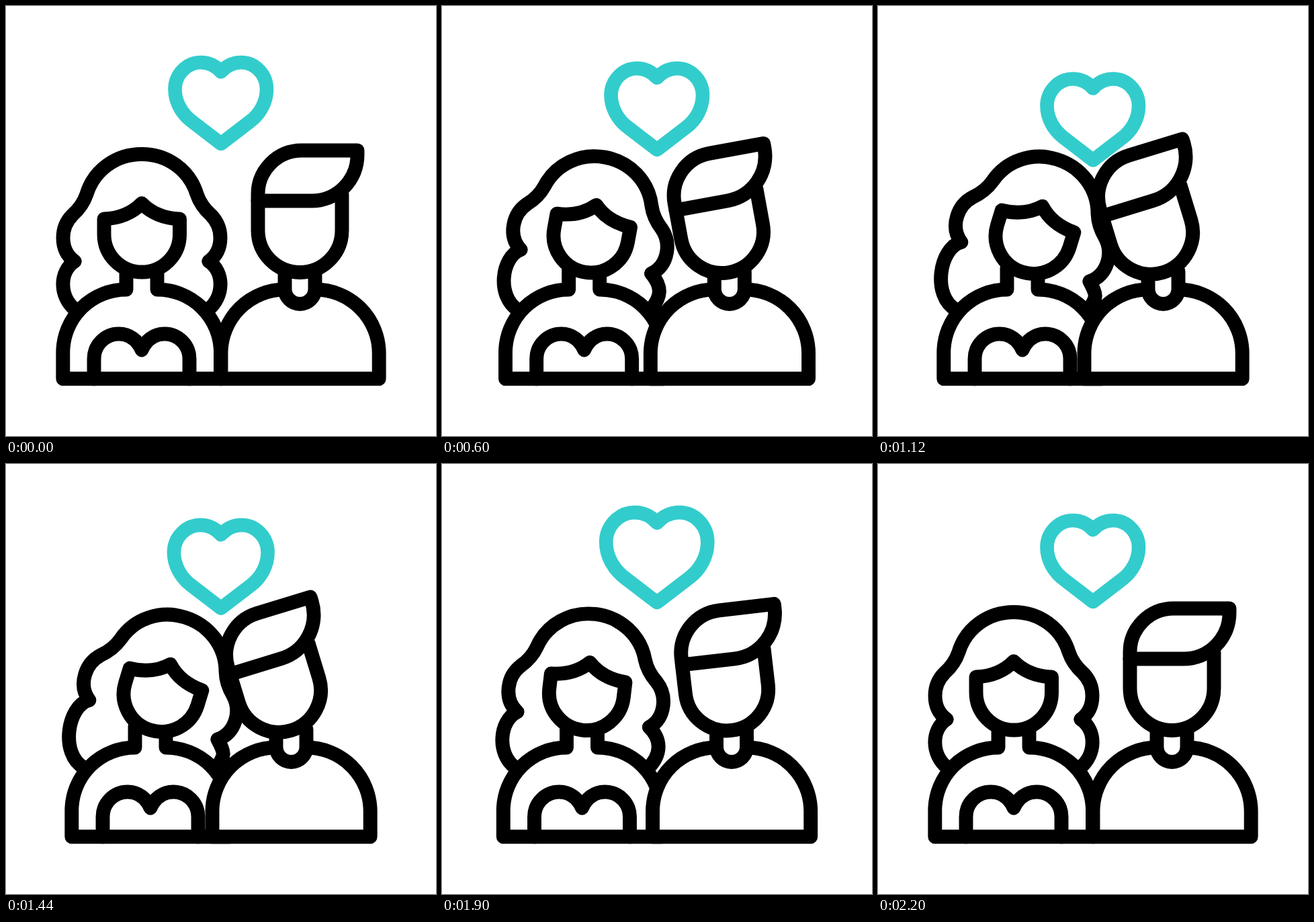
These frames come from a looping animation (640x640 px, 2.4 s). An HTML page:

```html
<!DOCTYPE html>
<html lang="en">
<head>
<meta charset="utf-8">
<title>Couple with beating heart</title>
<style>
  html, body { margin: 0; width: 100%; height: 100%; overflow: hidden; background: #fff; }
  svg { display: block; width: 100%; height: 100%; }
  path {
    fill: #fff; stroke: #000; stroke-width: 20.9;
    stroke-linecap: round; stroke-linejoin: round; vector-effect: non-scaling-stroke;
  }
  .line { fill: none; }
  #heart { fill: none; stroke: #33cccc; stroke-width: 20.6; }
</style>
</head>
<body>
<svg viewBox="0 0 640 640">
  <path id="heart" d="M320 98 C312 89 301 84 290 84 C269 84 251.5 102 251.5 124 C251.5 143 262 161 277 172 L320 205 L363 172 C378 161 388 143 388 124 C388 102 371 84 350 84 C339 84 328 89 320 98 Z"/>

  <g id="woman">
    <path class="line her-head" d="M102 380 C91 372 85 360 85 345 C85 332 90 320 99 311 C109 302 116 292 120 280 C131 244 164 220.5 202 220.5 C240 220.5 273 244 284 280 C288 292 295 302 305 311 C314 320 319 332 319 345 C319 360 313 372 302 380"/>
    <path class="line" id="locks"/>
    <path d="M179 390 V422 A94 94 0 0 0 84.8 515 V554.8 H319.5 V515 A94 94 0 0 0 225 422 V390"/>
    <path class="line" d="M131 554.8 V525 A37 37 0 0 1 168 488 C184 488 196 498 202 512 C208 498 220 488 236 488 A37 37 0 0 1 273 525 V554.8"/>
    <path class="her-head" d="M146 317 C168 316 187 309 202 293.7 C217 309 236 316 258.5 317 V340 A56.2 56 0 0 1 146 340 Z"/>
  </g>

  <g id="man">
    <path d="M415 422 A95 95 0 0 0 320 517 V554.8 H555.2 V517 A95 95 0 0 0 460 422"/>
    <path d="M415 395 V421 A22.5 22.5 0 0 0 460 421 V395"/>
    <g id="his-head">
      <path d="M375 290 V334 A62.5 62.5 0 0 0 500 334 V280"/>
      <path d="M375 290 V280 A65 65 0 0 1 440 215 H523 V222 A68 68 0 0 1 455 290 Z"/>
    </g>
  </g>
</svg>
<script>
  const LOOP = 2400, TILT = 17 * Math.PI / 180, LEAN = 13;
  const HER = { x: 202, y: 395 }, HIS = { x: 437.5, y: 397 };
  const HEART = { x: 319.8, y: 144.5 };

  const $ = id => document.getElementById(id);
  const put = (el, transform) => el.setAttribute('transform', transform);
  const herParts = document.querySelectorAll('.her-head');

  // Smooth 0..1 ramp between two times
  const ramp = (t, from, to) => {
    const u = Math.min(1, Math.max(0, (t - from) / (to - from)));
    return u * u * (3 - 2 * u);
  };

  // Bodies finish moving in a little before the heads finish tilting
  const lean = t => ramp(t, 200, 800) - ramp(t, 1600, 2200);
  const tilt = t => ramp(t, 200, 900) - ramp(t, 1500, 2200);

  const heartDrop = t =>
    25 * ramp(t, 200, 1200) - 34.5 * ramp(t, 1240, 1650) + 9.5 * ramp(t, 1650, 2200);

  // Two beats, a rest, two more beats
  const heartScale = t => {
    const beats = [200, 600, 1400, 1800];
    return 1 + 0.211 * beats.reduce(
      (sum, b) => sum + ramp(t, b, b + 200) - ramp(t, b + 200, b + 400), 0);
  };

  // Straight-line blend between the upright and the tilted pose
  const blend = (p, side) => ({
    c: 1 - p + p * Math.cos(TILT),
    s: side * p * Math.sin(TILT)
  });

  const pose = ({ c, s }, pivot) =>
    `translate(${pivot.x} ${pivot.y}) matrix(${c} ${s} ${-s} ${c} 0 0) ` +
    `translate(${-pivot.x} ${-pivot.y})`;

  const turn = (x, y, { c, s }) => {
    const dx = x - HER.x, dy = y - HER.y;
    return [HER.x + dx * c - dy * s, HER.y + dx * s + dy * c];
  };

  // Lower curl: its top follows the head, its end stays on the shoulder
  const lock = (side, p, head) => {
    const at = dx => HER.x + side * dx;
    const top = turn(at(100), 380, head);
    const [cx, cy] = turn(at(123), 396, head);
    return `M${top} C${cx - 6 * p} ${cy} ${at(123) - 12 * p} 432 ${at(99)} 452`;
  };

  function draw(t) {
    const shift = LEAN * lean(t), p = tilt(t), herHead = blend(p, 1);
    put($('woman'), `translate(${shift} 0)`);
    put($('man'), `translate(${-shift} 0)`);
    herParts.forEach(el => put(el, pose(herHead, HER)));
    put($('his-head'), pose(blend(p, -1), HIS));
    $('locks').setAttribute('d', lock(-1, p, herHead) + lock(1, p, herHead));
    put($('heart'), `translate(${HEART.x} ${HEART.y + heartDrop(t)}) ` +
      `scale(${heartScale(t)}) translate(${-HEART.x} ${-HEART.y})`);
  }

  const start = performance.now();
  function tick() {
    draw((performance.now() - start) % LOOP);
    requestAnimationFrame(tick);
  }
  tick();
</script>
</body>
</html>
```
